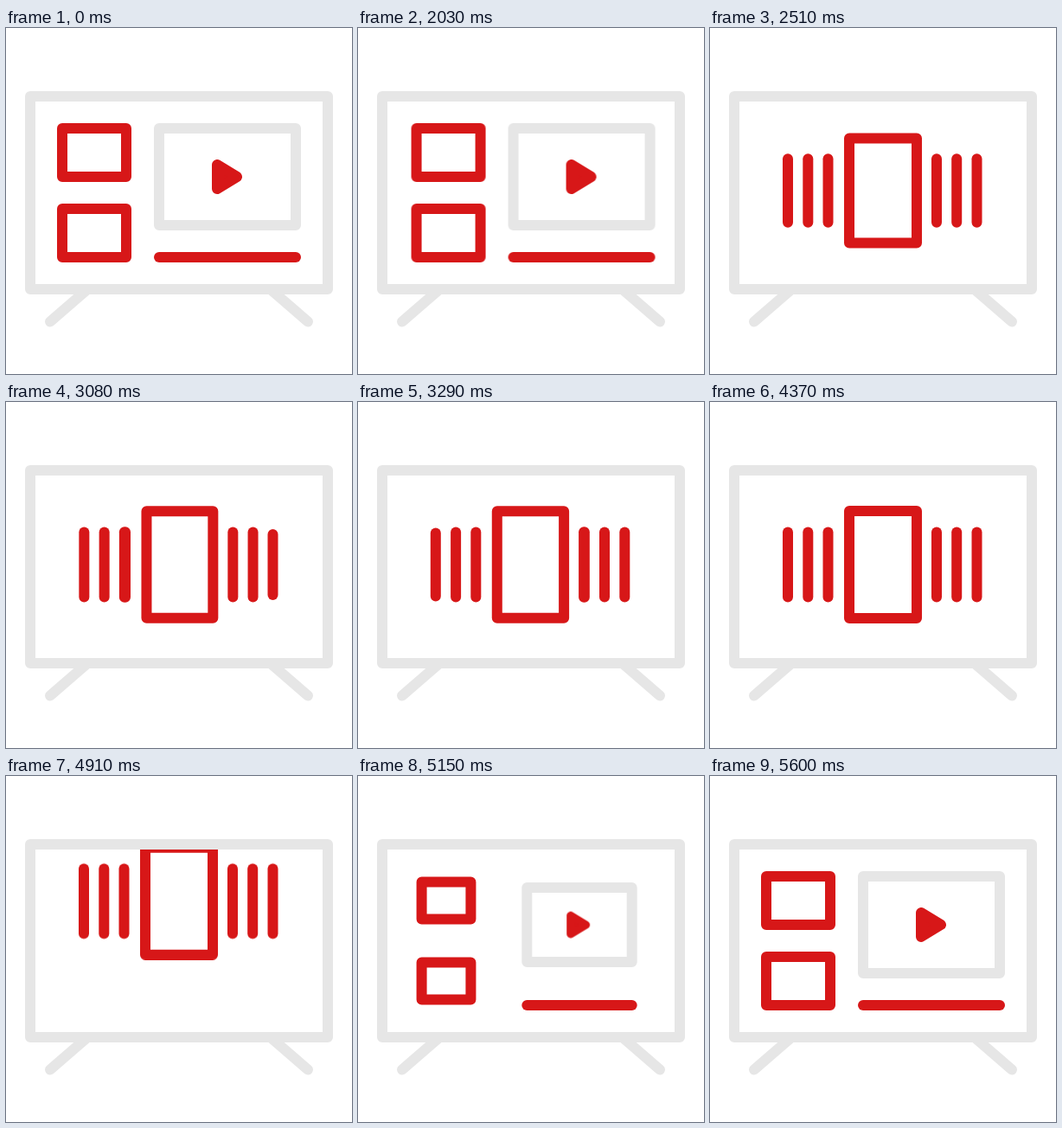
Recreate the animation shown at these times as an HTML page without scripts. Size 400 px wide and 400 px high, loop 5.63 s.

```html
<!DOCTYPE html>
<html lang="en">
<head>
<meta charset="utf-8">
<title>TV menu</title>
<style>
  html, body { margin: 0; width: 100%; height: 100%; overflow: hidden; background: #fff; }
  svg { display: block; width: 400px; height: 400px; }
  svg * { animation: 5630ms linear infinite; }
  .line { fill: none; stroke: #d71718; stroke-width: 12; stroke-linecap: round; stroke-linejoin: round; }
  .grey { stroke: #e6e6e6; }

  /* Menu page: slides out to the right, grows back in place */
  .menu { animation-name: slide-out; }
  .menu rect { animation-name: grow; }
  .play { fill: #d71718; transform-origin: 252px 172px; animation-name: grow-play; }
  @keyframes slide-out {
    0%, 35.79% { transform: none; animation-timing-function: cubic-bezier(.333, 0, .667, 1); }
    41.12%, 88.3% { transform: translateX(310px); }
    88.31%, 100% { transform: none; }
  }
  @keyframes grow {
    0%, 88%, 99.6%, 100% {
      x: calc(var(--x) - var(--w) / 2); y: calc(var(--y) - var(--h) / 2);
      width: var(--w); height: var(--h);
    }
    88.01%, 88.8% {
      x: var(--x); y: var(--y); width: 0px; height: 0px;
      animation-timing-function: cubic-bezier(.15, .85, .3, 1);
    }
  }
  @keyframes grow-play {
    0%, 88%, 99.6%, 100% { transform: scale(1); }
    88.01%, 88.8% { transform: scale(0); animation-timing-function: cubic-bezier(.15, .85, .3, 1); }
  }

  /* Cover flow: grows, steps right three times, leaves upwards */
  .flow { animation-name: lift; }
  .flow rect { --w: .01px; --h: 75px; --w2: .01px; --h2: 75px; animation-name: step; }
  .flow .opening { --w2: 78px; --h2: 124px; }
  .flow .closing { --w: 78px; --h: 124px; }
  .flow .first { animation-name: step, appear; }
  .flow .last { animation-name: step, vanish; }
  @keyframes lift {
    0%, 76.2% { transform: none; animation-timing-function: cubic-bezier(.8, 0, 1, 0); }
    88.81%, 100% { transform: translateY(-206px); }
  }
  @keyframes step {
    0%, 39.96% {
      x: calc(var(--x) - var(--w) / 2); y: 188px; width: var(--w); height: 0px;
      animation-timing-function: cubic-bezier(.3, .5, .45, 1);
    }
    45.68%, 49.96%, 54.42%, 58.7%, 63.55%, 67.83%, 100% {
      x: calc(var(--x) - var(--w) / 2); y: calc(188px - var(--h) / 2);
      width: var(--w); height: var(--h);
      animation-timing-function: cubic-bezier(.333, 0, .667, 1);
    }
    49.95%, 58.69%, 67.82% {
      x: calc(var(--x2) - var(--w2) / 2); y: calc(188px - var(--h2) / 2);
      width: var(--w2); height: var(--h2);
    }
  }
  @keyframes appear {
    0%, 47.58%, 49.96%, 56.32%, 58.7%, 65.45%, 67.83%, 100% {
      y: 188px; height: 0px;
      animation-timing-function: cubic-bezier(.333, 0, .667, 1);
    }
    49.95%, 58.69%, 67.82% { y: 150.5px; height: 75px; }
  }
  @keyframes vanish {
    0%, 39.96% { y: 188px; height: 0px; animation-timing-function: cubic-bezier(.3, .5, .45, 1); }
    45.68%, 49.96%, 54.42%, 58.7%, 63.55%, 67.83%, 100% {
      y: 150.5px; height: 75px;
      animation-timing-function: cubic-bezier(.333, 0, .667, 1);
    }
    47.58%, 49.95%, 56.32%, 58.69%, 65.45%, 67.82% { y: 188px; height: 0px; }
  }
</style>
</head>
<body>
<svg viewBox="0 0 400 400">
  <clipPath id="screen"><path d="M34 85H366V296H34Z"/></clipPath>
  <path class="line grey" d="M28 79H372V302H28ZM92 304L51 339.5M308 304L349 339.5"/>
  <g clip-path="url(#screen)">
    <g class="menu">
      <rect class="line" style="--x:102px;--y:144px;--w:74px;--h:56px"/>
      <rect class="line" style="--x:102px;--y:237px;--w:74px;--h:56px"/>
      <rect class="line grey" style="--x:256px;--y:172px;--w:158px;--h:112px"/>
      <rect class="line" style="--x:256px;--y:265px;--w:158px;--h:.01px"/>
      <path class="line play" d="M244 158V186L267 172Z"/>
    </g>
    <g class="flow">
      <rect class="line first" style="--x:66.5px;--x2:90px"/>
      <rect class="line" style="--x:90px;--x2:113.3px"/>
      <rect class="line" style="--x:113.3px;--x2:136.5px"/>
      <rect class="line opening" style="--x:136.5px;--x2:200px"/>
      <rect class="line closing" style="--x:200px;--x2:262px"/>
      <rect class="line" style="--x:262px;--x2:285.2px"/>
      <rect class="line" style="--x:285.2px;--x2:308.5px"/>
      <rect class="line last" style="--x:308.5px;--x2:308.5px"/>
    </g>
  </g>
</svg>
</body>
</html>
```
